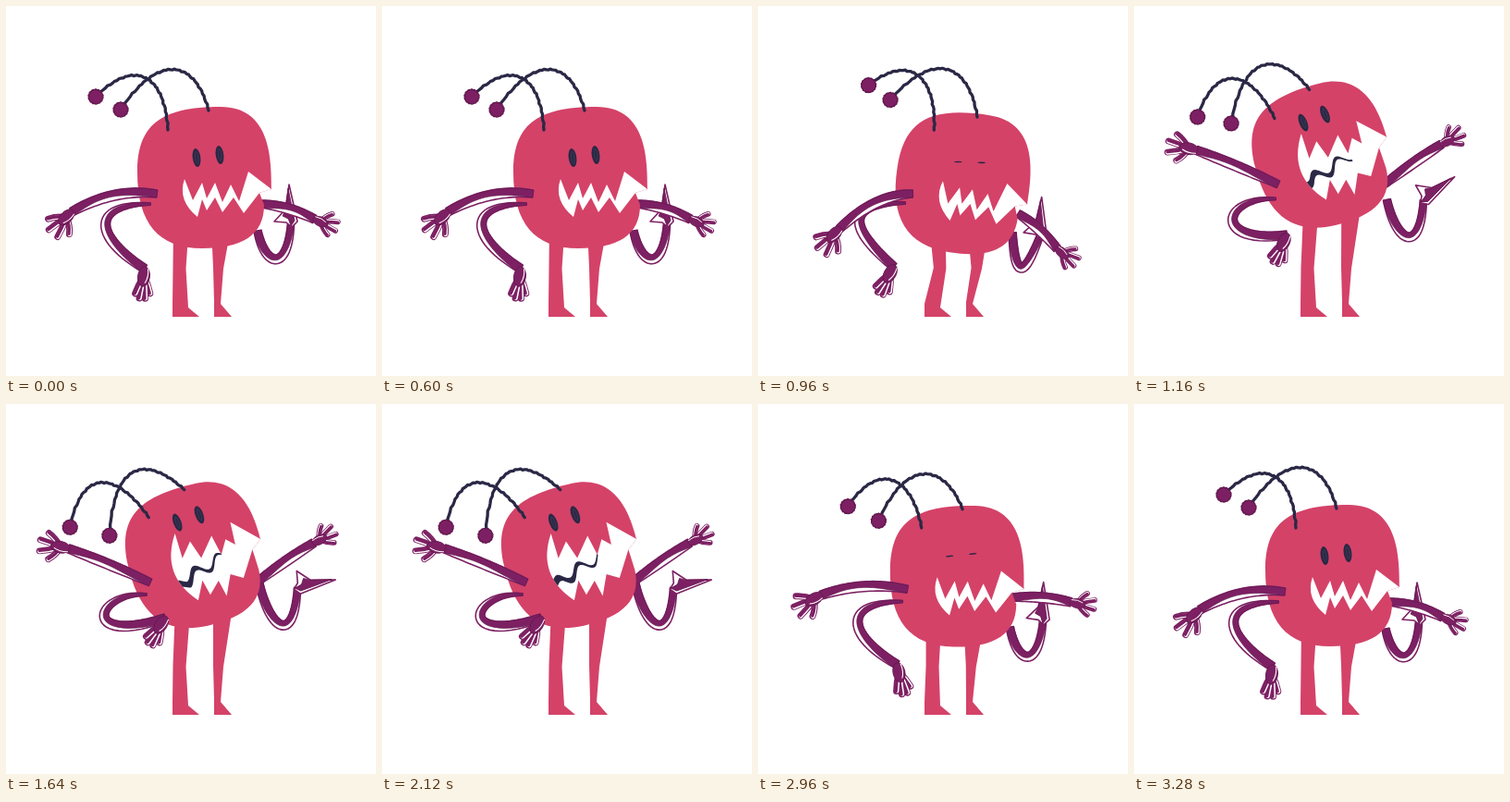
An HTML page with a canvas that plays this animation: 400x400 px, repeating every 3.68 s.

```html
<!DOCTYPE html>
<html lang="en">
<head>
<meta charset="utf-8">
<title>Monster roar</title>
<style>
html, body { margin: 0; width: 100%; height: 100%; overflow: hidden; background: #fff; }
canvas { display: block; width: 400px; height: 400px; }
</style>
</head>
<body>
<canvas id="stage"></canvas>
<script>
const LOOP = 3680, STEP = 40, TAU = Math.PI * 2;
const PINK = '#d44268', PURPLE = '#7d2063', PLUM = '#64184f', INK = '#2a2845';
const canvas = document.getElementById('stage');
const ctx = canvas.getContext('2d');
const dpr = window.devicePixelRatio || 1;
canvas.width = canvas.height = 400 * dpr;

const rad = d => d * Math.PI / 180;
const lerp = (a, b, u) => a + (b - a) * u;

// Eased value of a flat [time, value, time, value, ...] track.
function track(t, k) {
  if (t <= k[0]) return k[1];
  for (let i = 2; i < k.length; i += 2) {
    if (t <= k[i]) {
      const u = (t - k[i - 2]) / (k[i] - k[i - 2]);
      return lerp(k[i - 1], k[i + 1], u * u * (3 - 2 * u));
    }
  }
  return k[k.length - 1];
}

const TRACKS = {
  crouch: [600, 0, 760, 1, 880, 1.15, 1000, 1, 1120, 0, 2840, 0, 2960, .12, 3160, 0],
  open: [1000, 0, 1160, 1.12, 1320, 1, 2760, 1, 2960, 0],
  reach: [1040, 0, 1080, .15, 1120, .45, 1160, 1.02, 1240, 1.05, 1360, 1,
    2760, 1, 2960, .27, 3080, -.1, 3200, .03, 3280, 0],
  fold: [1080, 0, 1120, .2, 1160, .7, 1240, 1.07, 1360, 1, 2760, 1, 2960, .04, 3080, -.06, 3280, 0],
  whip: [1080, 0, 1160, .75, 1240, 1.15, 1320, .95, 1400, 1, 2760, 1, 2960, .3, 3080, -.13, 3180, .04, 3280, 0],
  swing: [2760, 0, 2960, -22, 3120, 5, 3280, 0],
  eye: [80, 1, 120, .6, 160, .08, 200, .08, 240, .4, 280, .8, 320, 1, 600, 1, 720, .08,
    1000, .08, 1080, 1, 2760, 1, 2880, .08, 2960, .08, 3080, 1]
};

// Every pose is listed as [rest, crouch, scream].
const mix = ([rest, crouch, open], c, o) =>
  rest.map((v, i) => v + (crouch[i] - v) * c + (open[i] - v) * o);

// shoulder x, y, arm angle, length, bend, hand angle
const LEFT_REACH = [[163, 203, 168, 94, 8, 135], [167, 203, 155, 88, 9, 132], [156, 193, 202, 96, 1, 190]];
const RIGHT_REACH = [[276, 214, 16, 60, 3, 22], [281, 224, 41, 57, 3, 38], [271, 193, -34, 75, 1, -28]];
// four curve points, hand angle
const LEFT_FOLD = [
  [156, 214, 90, 214, 95, 250, 150, 284, 97],
  [159, 213, 90, 214, 100, 242, 147, 282, 118],
  [152, 206, 95, 203, 80, 262, 172, 232, 122]];
const RIGHT_FOLD = [
  [272, 243, 280, 283, 305, 288, 308, 235, 0],
  [275, 245, 278, 300, 290, 290, 305, 248, 5],
  [274, 195, 285, 245, 312, 262, 315, 199, 80]];
// two controls and the ball, relative to the root
const FEELERS = [
  { root: [175, 134], pose: [[-3, -59, -35, -79, -78, -36], [3, -55, -25, -85, -71, -48], [-24, -37, -69, -67, -85, 10]] },
  { root: [219, 113], pose: [[-14, -55, -54, -63, -95, -1], [-8, -55, -45, -75, -94, -18], [-28, -27, -75, -47, -81, 49]] }
];
// closed x, y, open x, y; the first ten are the upper jaw
const MOUTH = [
  [193, 187, 199, 157], [202, 210, 201, 185], [212, 191, 213, 169], [217, 208, 221, 189],
  [226, 191, 237, 168], [234, 212, 243, 190], [243, 193, 251, 175], [252, 211, 260, 183],
  [262, 179, 260, 158], [287, 198, 288, 183],
  [274, 202, 277, 192], [257, 224, 261, 220], [246, 207, 248, 213], [234, 223, 239, 235],
  [226, 207, 234, 217], [217, 221, 222, 230], [212, 209, 217, 213], [207, 228, 208, 233]
];

function cubic(p, u) {
  const v = 1 - u, w = [v * v * v, 3 * v * v * u, 3 * v * u * u, u * u * u];
  return [0, 1].map(k => w.reduce((s, f, i) => s + f * p[2 * i + k], 0));
}

function curve(p, n = 28) {
  return Array.from({ length: n + 1 }, (_, i) => {
    const u = i / n, [x, y] = cubic(p, u);
    const [ax, ay] = cubic(p, Math.max(0, u - .01)), [bx, by] = cubic(p, Math.min(1, u + .01));
    const d = Math.hypot(bx - ax, by - ay) || 1;
    return { u, x, y, nx: (by - ay) / d, ny: (ax - bx) / d };
  });
}

function poly(points, close = true) {
  ctx.beginPath();
  points.forEach(([x, y]) => ctx.lineTo(x, y));
  if (close) ctx.closePath();
}

function fill(color) { ctx.fillStyle = color; ctx.fill(); }

function stroke(color, width) {
  ctx.strokeStyle = color;
  ctx.lineWidth = width;
  ctx.stroke();
}

function ellipse(x, y, rx, ry, turn = 0) {
  ctx.beginPath();
  ctx.ellipse(x, y, rx, ry, turn, 0, TAU);
}

function ribbon(line, lo, hi) {
  const edge = f => line.map(p => [p.x + p.nx * f(p.u), p.y + p.ny * f(p.u)]);
  poly([...edge(lo), ...edge(hi).reverse()]);
}

// Tapered arm with a white sliver between its ink line and its fill.
function limb(points, w0, wm, w1, side) {
  const line = curve(points);
  const w = u => (1 - u) * (1 - u) * w0 + 2 * u * (1 - u) * wm + u * u * w1;
  ribbon(line, u => -w(u), w);
  fill('#fff');
  stroke(PURPLE, 1.6);
  ribbon(line, u => -side * w(u), u => side * w(u) * (1 - .85 * Math.sin(Math.PI * u ** 1.3)));
  fill(PURPLE);
  stroke(PLUM, .7);
}

function at(x, y, turn, scale, draw) {
  ctx.save();
  ctx.translate(x, y);
  ctx.rotate(turn);
  ctx.scale(scale, scale);
  draw();
  ctx.restore();
}

function hand(x, y, angle, scale, spread) {
  at(x, y, rad(angle), scale, () => {
    [-58, -22, 10, 42].forEach((a, i) => {
      const f = rad(a * spread), len = [17, 21, 21, 18][i];
      const finger = (shift, color, width) => {
        ctx.beginPath();
        ctx.moveTo(8, shift);
        ctx.quadraticCurveTo(8 + len * .55 * Math.cos(f * 1.25), shift + len * .55 * Math.sin(f * 1.25),
          9 + len * Math.cos(f), shift + len * Math.sin(f));
        stroke(color, width);
      };
      finger(0, PURPLE, 6.6);
      finger(-.5, '#fff', 4);
      finger(.5, PURPLE, 3.2);
    });
    ellipse(8, 0, 10, 6);
    fill(PURPLE);
    stroke(PLUM, .8);
    ctx.beginPath();
    ctx.moveTo(0, -3.4);
    ctx.quadraticCurveTo(8, -5, 14, -2);
    stroke('#fff', 1);
  });
}

function reachArm(pose, side, scale) {
  const [x, y, angle, len, bend, turn] = pose;
  const dx = Math.cos(rad(angle)) * len, dy = Math.sin(rad(angle)) * len, lift = bend * 4 / 3;
  limb([x, y, x + dx / 3, y + dy / 3 - lift, x + dx * 2 / 3, y + dy * 2 / 3 - lift, x + dx, y + dy], 4, 6.5, 4.5, side);
  hand(x + dx, y + dy, turn, scale, 1);
}

function pointingHand(x, y, turn) {
  at(x, y, rad(turn), 1, () => {
    poly([[1, 4], [7, -2], [-2, -42], [-6, -15], [-18, -2], [-5, -1]]);
    fill('#fff');
    stroke(PURPLE, 1.6);
    poly([[0, 3], [4, -3], [-3, -38], [-6, -14], [-9, -8], [-3, -5]]);
    fill(PURPLE);
    stroke(PLUM, .8);
  });
}

function legs(c, o, ty) {
  const hip = 5 * c + 2 * o, knee = 9 * c, top = 240 + ty;
  poly([[181 + hip, top], [180.5 + knee, 283], [180, 322], [180, 336], [209, 336], [197, 326],
    [194.5 + knee * .95, 284], [197.5 + hip, top]]);
  fill(PINK);
  poly([[222 + hip, top], [224 + knee * .7, 283], [225, 320], [225, 336], [244, 336], [232, 322],
    [235 + knee * .75, 284], [243 + hip, top]]);
  fill(PINK);
}

function tongue(t, m) {
  const line = [];
  for (let i = 0; i <= 40; i++) {
    const u = i / 40;
    const wave = 5.5 * Math.cos(TAU * ((u - .28) / .48 - t / 360 + .222)) * Math.min(1, u * 5);
    line.push([lerp(189, 244, u) - wave * .3, lerp(213, 192.6, u) - wave, lerp(4.2, 1, u) * m]);
  }
  poly([...line.map(([x, y, w]) => [x - w * .4, y - w]),
    ...line.reverse().map(([x, y, w]) => [x + w * .4, y + w])]);
  fill(INK);
}

function head(t, o, eye) {
  const m = Math.max(0, Math.min(1, o));
  const mouth = MOUTH.map(([x, y, X, Y]) => [lerp(x, X, m), lerp(y, Y, m)]);
  const lip = mouth[9], jaw = mouth[10];

  ctx.beginPath();
  ctx.moveTo(...lip);
  ctx.bezierCurveTo(287, 165, 286, 109, 232, 109);
  ctx.bezierCurveTo(165, 109, 142, 130, 142, 180);
  ctx.bezierCurveTo(142, 235, 165, 262, 212, 262);
  ctx.bezierCurveTo(255, 262, 279, 248, 279, 215);
  ctx.lineTo(...jaw);
  ctx.closePath();
  fill(PINK);

  ctx.save();
  poly(mouth, false);
  ctx.quadraticCurveTo(lerp(185, 174, m), lerp(210, 198, m), ...mouth[0]);
  fill('#fff');
  ctx.clip();
  if (m > .5) tongue(t, m);
  ctx.restore();

  for (const [x, y] of [[206, 164], [231, 161]]) {
    at(x - 2 * m, y - 18 * m, rad(-8), 1, () => {
      ellipse(0, 0, 4.3, 10 * eye);
      fill(INK);
      ellipse(.3, 0, 1.6, 6.5 * eye);
      stroke('#45415c', .6 * eye);
    });
  }
}

function feeler(x, y, p) {
  const points = [x, y, ...p.map((v, i) => v + (i % 2 ? y : x))];
  const rough = curve(points, 48).map((q, i) => {
    const k = .5 * Math.sin(i * 2.3) + .25 * Math.sin(i * 5.1);
    return [q.x + q.nx * k, q.y + q.ny * k];
  });
  poly(rough, false);
  stroke(INK, 3.3);
  const bx = points[6], by = points[7];
  poly(Array.from({ length: 32 }, (_, i) => {
    const r = 7.8 + .35 * Math.sin(i * 2.7), a = i / 32 * TAU;
    return [bx + r * Math.cos(a), by + r * Math.sin(a)];
  }));
  fill(PURPLE);
  stroke(PLUM, 1.5);
}

function draw(t) {
  const v = {};
  for (const name in TRACKS) v[name] = track(t, TRACKS[name]);
  const quiver = t > 1360 && t < 2760 ? .012 * Math.sin(t / 160 * TAU) : 0;
  const c = v.crouch, o = v.open;
  const tx = 6.6 * c - 10.4 * o, ty = 5.3 * c - 21 * o, turn = rad(8.5 * c - 12.5 * o);
  const reach = v.reach + quiver, fold = v.fold + quiver, whip = v.whip + quiver;
  const late = c * (1 - Math.max(0, Math.min(1, reach)));

  ctx.setTransform(dpr, 0, 0, dpr, 0, 0);
  ctx.fillStyle = '#fff';
  ctx.fillRect(0, 0, 400, 400);
  ctx.lineCap = ctx.lineJoin = 'round';

  const right = mix(RIGHT_FOLD, late, fold);
  limb(right.slice(0, 8), 4, 6, 3.5, -1);
  pointingHand(right[6], right[7], right[8]);
  reachArm(mix(RIGHT_REACH, late, reach), -1, .86);

  legs(c, o, ty);
  ctx.save();
  ctx.translate(214 + tx, 186 + ty);
  ctx.rotate(turn);
  ctx.translate(-214, -186);
  head(t, o, v.eye);
  ctx.restore();

  const left = mix(LEFT_FOLD, late, fold);
  limb(left.slice(0, 8), 1.2, 7, 4.5, -1);
  hand(left[6], left[7], left[8] + v.swing, 1.08, .5);
  reachArm(mix(LEFT_REACH, late, reach), 1, 1.05);

  const cos = Math.cos(turn), sin = Math.sin(turn);
  for (const { root: [x, y], pose } of FEELERS) {
    const dx = x - 214, dy = y - 186;
    feeler(214 + tx + dx * cos - dy * sin, 186 + ty + dx * sin + dy * cos, mix(pose, late, whip));
  }
}

const start = performance.now();
function frame() {
  const t = (performance.now() - start) % LOOP;
  draw(Math.floor(t / STEP) * STEP);
  requestAnimationFrame(frame);
}
frame();
</script>
</body>
</html>
```
